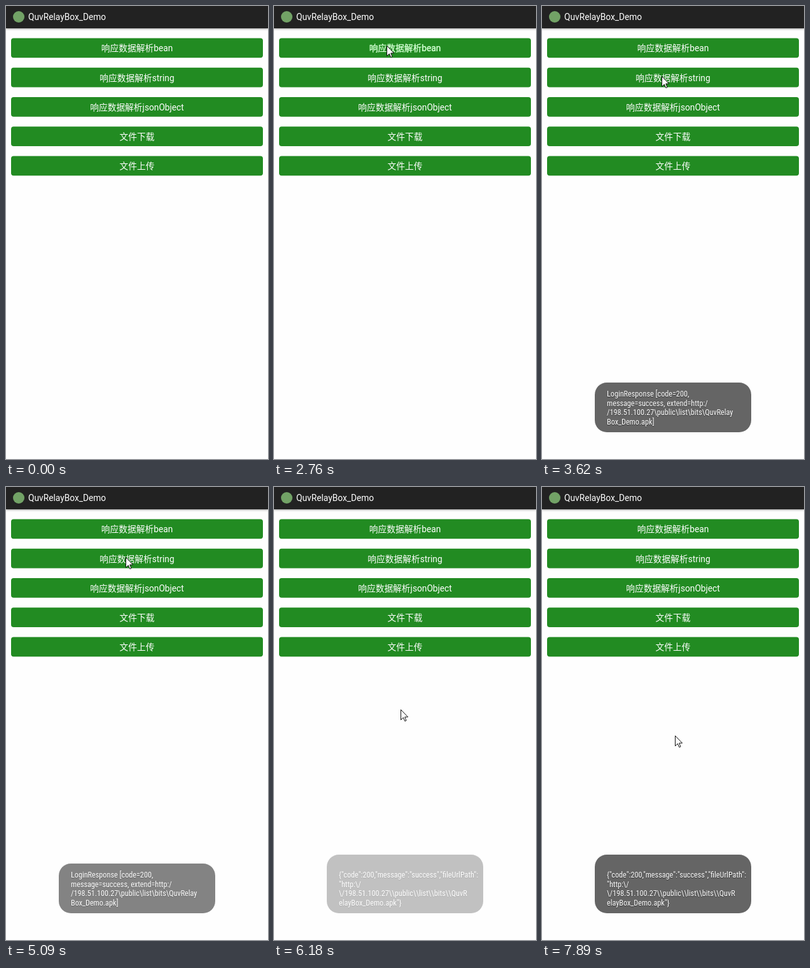
An HTML page for the animation above (8 s loop, 412 px wide and 711 px high).

```html
<!DOCTYPE html>
<html lang="zh-CN">
<head>
<meta charset="utf-8">
<style>
html, body { margin: 0; width: 100%; height: 100%; overflow: hidden; background: #fefefe; }
body { position: relative; color: #fff; font-family: Roboto, "Noto Sans CJK SC", "Noto Sans CJK", sans-serif; font-size: 13.74px; }
header { position: absolute; inset: 0 0 auto; height: 35px; background: #222; box-shadow: 0 1px 3px rgba(0,0,0,.4); line-height: 35px; text-indent: 35px; }
header::before { content: ""; position: absolute; left: 11px; top: 8px; width: 18px; height: 18px; border-radius: 50%; background: #72a266; }
svg { position: absolute; left: 0; top: 0; overflow: visible; }
rect { fill: #228b22; }
text { fill: #fff; text-anchor: middle; }
.pressed text { fill: #d9ffd9; text-shadow: 0 0 1px #b4ffb4; }
.toast { position: absolute; left: 83px; width: 246px; bottom: 42px; box-sizing: border-box; padding: 0 0 9px 19px; border-radius: 19px; background: rgba(0,0,0,.6); opacity: 0;
  font: 12.2px/14.5px "Roboto Condensed", Roboto, sans-serif; font-stretch: 75%; white-space: pre; text-shadow: 0 1px 1px rgba(0,0,0,.5); }
</style>
</head>
<body>
<header>QuvRelayBox_Demo</header>
<svg id="buttons" width="412" height="711"></svg>
<svg id="cursor" width="13" height="20"><path d="M.5 .5V16.5L4.3 12.9L6.8 18.5L9 17.6L6.7 12H11.6Z" fill="#fff" stroke="#111"/></svg>
<script>
const LOOP = 8000;
const TICK = 78; // the screen refreshes once per tick
const cursor = document.getElementById('cursor');
const list = document.getElementById('buttons');

function addSvg(parent, tag, attributes) {
  const el = document.createElementNS('http://www.w3.org/2000/svg', tag);
  for (const name in attributes) el.setAttribute(name, attributes[name]);
  return parent.appendChild(el);
}

function addButton(label, i) {
  const top = 50.4 + 46.27 * i;
  const group = addSvg(list, 'g', {});
  addSvg(group, 'rect', { x: 8, y: top, width: 396, height: 30.8, rx: 4 });
  addSvg(group, 'text', { x: 206, y: Math.round(top + 21) }).textContent = label;
  return group;
}

function addToast(height, lines) {
  const el = document.createElement('div');
  el.className = 'toast';
  el.textContent = lines.join('\n');
  el.style.height = height + 'px';
  el.style.paddingTop = height - 67 + 'px';
  document.body.insertBefore(el, cursor);
  return el;
}

const [beanButton, stringButton] =
  ['响应数据解析bean', '响应数据解析string', '响应数据解析jsonObject', '文件下载', '文件上传'].map(addButton);

const beanToast = addToast(78, [
  'LoginResponse [code=200,',
  'message=success, extend=http:/',
  String.raw`/198.51.100.27\public\list\bits\QuvRelay`,
  'Box_Demo.apk]'
]);
const stringToast = addToast(92, [
  '{"code":200,"message":"success","fileUrlPath":',
  String.raw`"http:\/`,
  String.raw`\/198.51.100.27\\public\\list\\bits\\QuvR`,
  'elayBox_Demo.apk"}'
]);

// Progress from 0 to 1, moving only on ticks; the first step falls on `from`.
function progress(t, from, to) {
  if (t < from) return 0;
  if (t >= to) return 1;
  const ticks = Math.round((to - from) / TICK);
  return (Math.floor((t - from) / (to - from) * ticks) + 1) / (ticks + 1);
}

const easeOut = p => 1 - (1 - p) ** 2;

function cursorAt(t) {
  let x = 322, y = 639;
  function glide(from, to, endX, endY) {
    const p = easeOut(progress(t, from, to));
    x += (endX - x) * p;
    y += (endY - y) * p;
  }
  glide(520, 610, 299, 515);
  glide(760, 1770, 177, 62);
  glide(3090, 3620, 188, 110);
  glide(6020, 6420, 202, 428);
  glide(6710, 6710, 210, 406);
  glide(7340, 7890, 209, 390);
  return `translate(${Math.round(x)}px, ${Math.round(y)}px)`;
}

function press(button, t, from, to) {
  button.classList.toggle('pressed', t >= from && t < to);
}

function draw(now) {
  const t = now % LOOP;
  cursor.style.visibility = t < 440 ? 'hidden' : 'visible';
  cursor.style.transform = cursorAt(t);
  press(beanButton, t, 2760, 2930);
  press(stringButton, t, 5790, 5940);
  beanToast.style.opacity = progress(t, 3090, 3390) - progress(t, 5090, 5400);
  stringToast.style.opacity = progress(t, 6100, 6420);
  requestAnimationFrame(draw);
}
requestAnimationFrame(draw);
</script>
</body>
</html>
```
